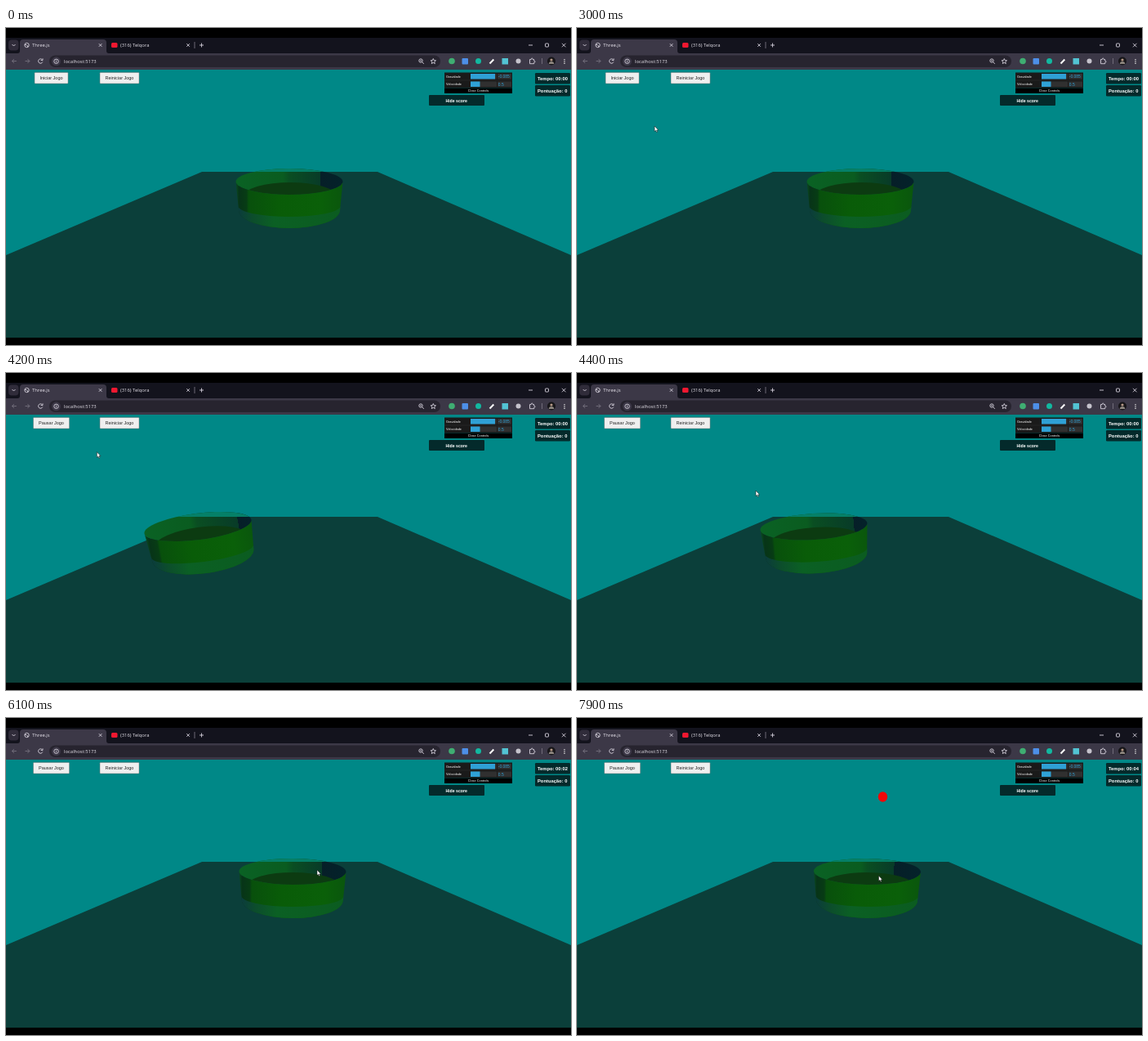
These frames come from a looping animation (692 px wide and 388 px high, 8 s). An HTML page:

```html
<!DOCTYPE html>
<html lang="pt">
<head>
<meta charset="utf-8">
<title>Three.js</title>
<style>
  html, body { margin: 0; width: 100%; height: 100%; overflow: hidden; background: #000; }
  svg { display: block; width: 100%; height: 100%; }
  text { font: 5.5px "Liberation Sans", Arial, sans-serif; fill: #fff; }
  .mid { text-anchor: middle; }
  .chrome text { font: 5.9px "Open Sans", sans-serif; fill: #e4e1e9; }
  .line { fill: none; stroke: #d5d1dc; stroke-width: .9; }
  .dim { stroke: #77727f; }
  .button rect { fill: #efefef; stroke: #767676; stroke-width: .5; }
  .button text { fill: #222; text-anchor: middle; }
  .gui text { font-size: 3.9px; }
  .gui .value { font-size: 4.9px; fill: #2fa1d6; }
  .score rect { fill: #042a2b; }
  .score text { font-size: 5.8px; font-weight: bold; }
</style>
</head>
<body>
<svg viewBox="0 0 692 388" preserveAspectRatio="none">
  <defs>
    <linearGradient id="back" gradientUnits="userSpaceOnUse" x1="-65.5" x2="65.5">
      <stop stop-color="#0a6224"/>
      <stop offset=".44" stop-color="#0a5c20"/>
      <stop offset=".5" stop-color="#0a4e22"/>
      <stop class="shade" stop-color="#083b28"/>
      <stop class="shade" stop-color="#061f28"/>
      <stop offset="1" stop-color="#04222a"/>
    </linearGradient>
    <linearGradient id="front">
      <stop stop-color="#0a4c20"/>
      <stop offset=".03" stop-color="#073418"/>
      <stop offset=".1" stop-color="#073c14"/>
      <stop offset=".12" stop-color="#08500c"/>
      <stop offset=".4" stop-color="#095c08"/>
      <stop offset=".8" stop-color="#0a6009"/>
      <stop offset="1" stop-color="#0a560d"/>
    </linearGradient>
    <linearGradient id="base">
      <stop stop-color="#0b3c3c"/>
      <stop offset=".14" stop-color="#0c4d2c"/>
      <stop offset=".35" stop-color="#0b6024"/>
      <stop offset="1" stop-color="#0b5c20"/>
    </linearGradient>
    <clipPath id="rim"><ellipse rx="65.5" ry="16"/></clipPath>
  </defs>

  <g class="chrome">
    <path fill="#13131d" d="M0 12H692V32H0z"/>
    <path fill="#3c3847" d="M0 31H692V51H0z M14 31Q17 31 17 28V18Q17 14 21 14H119Q123 14 123 18V28Q123 31 126 31z"/>
    <rect x="3" y="14.500" width="12.500" height="13" rx="4" fill="#302c3a"/>
    <path class="line" d="M7.500 20l2 2 2-2 M113.800 19.200l3.600 3.600m0-3.600l-3.600 3.600 M221.300 19.200l3.600 3.600m0-3.600l-3.600 3.600 M237 21h5m-2.500-2.500v5 M640 21h5 M681 18.800l4.500 4.500m0-4.500l-4.500 4.500"/>
    <rect class="line" x="660.500" y="19" width="4" height="4" rx=".6"/>
    <path class="line dim" d="M231 17v8"/>
    <circle class="line" cx="25.500" cy="21" r="2.700"/>
    <path class="line" stroke-width=".6" d="M23 20.500h2l1.500 1.500v1.500"/>
    <text x="32" y="23.200">Three.js</text>
    <rect x="129" y="18" width="7.500" height="6" rx="1.500" fill="#f01830"/>
    <text x="140" y="23.200">(316) Telqora</text>

    <path class="line dim" d="M12.800 40.500H7.500m2.400-2.500l-2.500 2.500 2.500 2.500 M23.500 40.500h5.300m-2.400-2.500l2.500 2.500-2.500 2.500"/>
    <path class="line" d="M44.500 39a2.700 2.700 0 1 0 .3 2.500 M45 37.300v2.200h-2.300"/>
    <rect x="53" y="33.500" width="479" height="14.500" rx="7.200" fill="#27242f"/>
    <circle cx="61.500" cy="40.800" r="5.500" fill="#3c3847"/>
    <circle class="line" cx="61.500" cy="40.800" r="2.700"/>
    <path class="line" d="M61.500 40.500v1.700m0-3.200v.6"/>
    <text x="71" y="43">localhost:5173</text>
    <circle class="line" cx="508" cy="40" r="2.200"/>
    <path class="line" d="M509.600 41.600l2.200 2.300 M507 40h2 M523.300 37.500l.9 2.100 2.300.2-1.800 1.500.6 2.300-2-1.200-2 1.200.6-2.300-1.800-1.500 2.300-.2z"/>
    <circle cx="546" cy="40.500" r="3.800" fill="#3fae72"/>
    <rect x="558.500" y="37" width="7.500" height="7.500" rx="1" fill="#4d8fe8"/>
    <circle cx="578.500" cy="40.500" r="3.500" fill="#12b8a0"/>
    <path stroke="#fff" stroke-width="2" d="M592.500 43.500l4.800-5"/>
    <rect x="607.500" y="37" width="7.500" height="7.500" fill="#52c3d3"/>
    <circle cx="627.500" cy="40.500" r="3" fill="#c5c3cc"/>
    <path class="line" d="M641.500 38.500h1.700q0-1.500 1-1.500t1 1.500h1.500v1.700q1.300 0 1.300 1t-1.300 1v1.500h-5.200z"/>
    <path class="line dim" d="M656.500 37v7"/>
    <circle cx="668" cy="40.500" r="5" fill="#171619"/>
    <circle cx="668" cy="39" r="1.600" fill="#b79a87"/>
    <path d="M664.800 44q0-3 3.200-3t3.200 3z" fill="#8d867f"/>
    <path d="M684 38v6" stroke="#ddd" stroke-width="1.300" stroke-dasharray="1.300 1"/>
  </g>

  <path fill="#008887" d="M0 51H692V379H0z"/>
  <path fill="#0b3f3a" d="M240 176H455L692 278V379H0V278z"/>

  <g id="bowl">
    <ellipse rx="65.500" ry="16" fill="url(#back)"/>
    <g clip-path="url(#rim)">
      <path id="skyline" d="M-80 -30H80V-12H-80z" fill="#058068"/>
      <ellipse cx="1" cy="17" rx="56" ry="16" fill="#0c3b11"/>
    </g>
    <path fill="url(#front)" d="M-65.500 0L-62 35A62 22 0 0 0 62 35L65.500 0A65.500 16 0 0 1 -65.500 0z"/>
    <path fill="url(#base)" d="M-62.500 30A62.500 13 0 0 0 62.500 30L62 35A62 22 0 0 1 -62 35z"/>
  </g>
  <ellipse id="ball" cx="374.500" rx="5.700" ry="6.200" fill="#f00808"/>

  <g class="button">
    <rect id="startBox" y="54.500" height="13.500" rx=".8"/>
    <text id="startText" x="55.500" y="63.300"></text>
    <rect x="115" y="54.500" width="48" height="13.500" rx=".8"/>
    <text x="139" y="63.300">Reiniciar Jogo</text>
  </g>

  <g class="gui">
    <path fill="#1a1a1a" d="M537 54.500H620V73.500H537z"/>
    <path fill="#000" d="M537 73.500H620V80H537z"/>
    <path stroke="#2c2c2c" stroke-width=".5" d="M537 64H620"/>
    <path fill="#303030" d="M569 56h32v6.500h-32z M602 56h17v6.500h-17z M569 65.500h32v6.500h-32z M602 65.500h17v6.500h-17z"/>
    <path fill="#2fa1d6" d="M569 56h30v6.500h-30z M569 65.500h11.500v6.500h-11.500z"/>
    <text x="539" y="60.500">Gravidade</text>
    <text x="539" y="70">Velocidade</text>
    <text class="value" x="602.800" y="61">-0.085</text>
    <text class="value" x="602.800" y="70.500">0.5</text>
    <text class="mid" x="578.500" y="78">Close Controls</text>
  </g>

  <g class="score">
    <rect x="648" y="55" width="43" height="13.500" rx="1.200"/>
    <rect x="648" y="70" width="43" height="13.500" rx="1.200"/>
    <rect x="518" y="82" width="68" height="13" rx="1"/>
    <text id="clock" x="651" y="63.800"></text>
    <text x="651" y="78.800">Pontuação: 0</text>
    <text class="mid" x="551.700" y="90.500" style="font-size:5.200px">Hide score</text>
  </g>

  <g id="cursor" fill="#fff" stroke="#111" stroke-width=".5">
    <path id="arrow" d="M0 0V6.600L1.500 5.300 2.500 7.600 3.600 7.100 2.600 4.900H4.600z"/>
    <path id="hand" d="M1 .6Q1.700-.3 2.300.6V3L5 3.700Q5.700 4 5.500 5L4.900 7.800H1.700L-.6 5Q-.5 3.800 1 4.700z"/>
  </g>
</svg>
<script>
const DURATION = 8000, STEP = 100, CLICK = 3800;
const $ = id => document.getElementById(id);
const shades = document.querySelectorAll('.shade');

// Each key is [time, ...values].
const cursorKeys = [
  [2200, 300, 378], [2600, 215, 260], [3000, 95, 120], [3300, 57, 61], [4000, 57, 61],
  [4100, 57.5, 73], [4400, 219, 144], [4600, 320, 155], [4900, 397, 142], [5500, 397, 142],
  [5800, 397, 157], [5900, 397, 157], [6000, 379, 178], [6100, 381, 186], [6600, 381, 186],
  [7000, 381, 197], [7100, 381, 197], [7300, 389.5, 190], [7900, 369.5, 193]
];
const bowlKeys = [
  [4100, 347], [4200, 235], [4400, 290], [4600, 345], [4900, 371], [5900, 371],
  [6000, 352], [6100, 351], [6300, 363], [7100, 363], [7300, 369], [7900, 355.5]
];

function track(keys, t) {
  const next = keys.findIndex(key => key[0] > t);
  if (next < 0) return keys.at(-1).slice(1);
  if (next === 0) return keys[0].slice(1);
  const a = keys[next - 1], b = keys[next];
  const p = (t - a[0]) / (b[0] - a[0]);
  return a.slice(1).map((v, i) => v + (b[i + 1] - v) * p);
}

const show = (id, visible) => $(id).setAttribute('visibility', visible ? 'visible' : 'hidden');

function drawBowl(t) {
  const [x] = track(bowlKeys, t), shift = x - 347;
  // Perspective leans the bowl away from the middle of the stage.
  $('bowl').setAttribute('transform',
    `matrix(1 ${shift * .00115} ${-shift * .0016} 1 ${x} 188)`);
  const edge = Math.min(49, 38 - shift * .6);
  shades.forEach(stop => stop.setAttribute('offset', (edge + 65.5) / 131));
  $('skyline').setAttribute('transform', `skewY(${-shift * .066})`);
}

function drawButton(t) {
  const started = t >= CLICK;
  $('startText').textContent = started ? 'Pausar Jogo' : 'Iniciar Jogo';
  $('startBox').setAttribute('x', started ? 33.5 : 35);
  $('startBox').setAttribute('width', started ? 44 : 41);
  $('startBox').style.fill = t >= 3600 && t < 4200 ? '#e5e5e5' : '';
}

function drawCursor(t) {
  const [x, y] = track(cursorKeys, t), pointing = t >= 3300 && t < 4200;
  $('cursor').setAttribute('transform', `translate(${x} ${y})`);
  show('arrow', t >= 2200 && !pointing);
  show('hand', pointing);
}

function frame(now) {
  const t = Math.floor(now % DURATION / STEP) * STEP;
  const seconds = Math.max(0, Math.floor((t - CLICK) / 1000));
  $('clock').textContent = `Tempo: 00:0${seconds}`;
  drawBowl(t);
  drawButton(t);
  drawCursor(t);
  show('ball', t >= 7800);
  $('ball').setAttribute('cy', 96.5 - (7900 - t) * .15);
  requestAnimationFrame(frame);
}
frame(performance.now());
</script>
</body>
</html>
```
